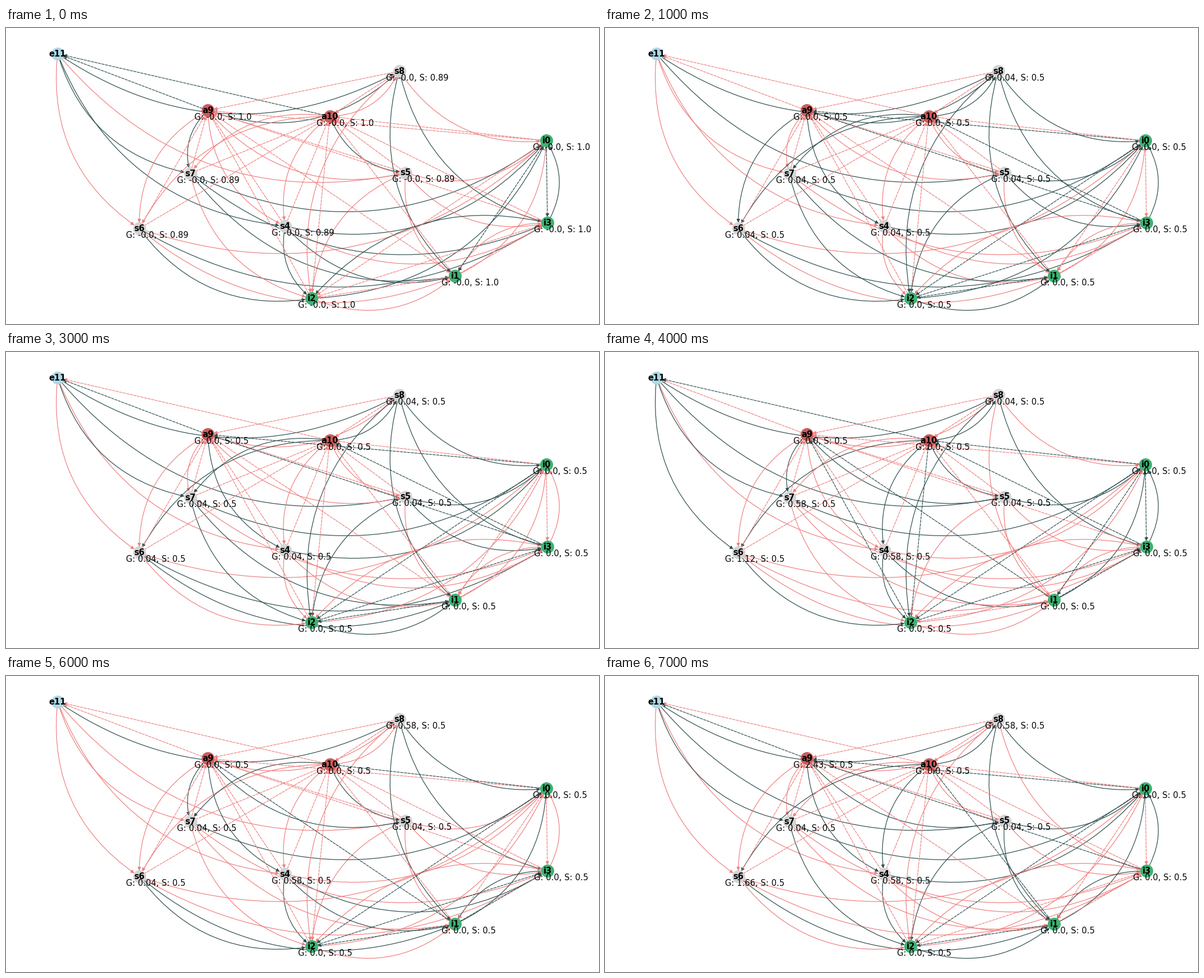
A matplotlib script that plays this animation: 1058 by 529 pixels, repeating every 8000 ms.

```python
import matplotlib.pyplot as plt
from matplotlib.animation import FuncAnimation
from matplotlib.patches import FancyArrowPatch

W, H, DPI = 1058, 529, 88.1667
RED, DARK = "lightcoral", "darkslategrey"
FILL = {"e": "lightblue", "a": "indianred", "s": "lightgrey", "i": "mediumseagreen"}
NODE_SIZE = 300

POS = {
    "e11": (92, 46), "s8": (701.7, 77), "a9": (360, 147.5), "a10": (577.7, 158),
    "i0": (964, 201.5), "s7": (328.7, 260), "s5": (713, 258.7), "s4": (498, 354.2),
    "s6": (237.7, 358.5), "i3": (966, 348.5), "i1": (801, 443.5), "i2": (545, 483.5),
}

# Dark edges of each step, as source>targets; every other edge is red.
STEPS = [
    "e11>s4,s7,s8 a9>e11,s7,s8 a10>e11,s5 s4>i0,i1,i2 s6>i2,i3 s7>i0,i1,i3 "
    "s8>i1,i3 i0>i1,i3 i2>i0 i3>i0,i2",

    "e11>s5,s8 a9>s4,s6,s8 a10>s6,s7,s8 s4>i0 s5>i0,i2,i3 s6>i2,i3 s7>i0,i1,i2 "
    "s8>i0,i1,i2,i3 i0>a9,i2 i1>i2 i2>i0,i1,i3 i3>i0,a9,a10",

    "e11>s5,s7,s8 a9>e11,s4,s6,s8 a10>s6,s7,s8 s4>i0 s5>i0,i2,i3 s6>i3 "
    "s7>i0,i1,i2 s8>i0,i1,i2,i3 i0>a9,i2 i1>i2 i2>i0,i1,i3 i3>a9,a10",

    "e11>s5,s7,s8 a9>e11,s4 a10>s6,s7,s8 s4>i0 s5>i0,i2,i3 s6>i1,i3 "
    "s7>i0,i1,i2 s8>i0,i1,i2,i3 i0>a9,i2 i1>i2 i2>i1,i3 i3>a9,a10",

    "e11>s5,s6,s7,s8 a9>s5,s7 a10>e11,s4,s5,s6,s8 s4>i1,i2 s5>i0 s6>i2 s7>i0 "
    "s8>i2,i3 i0>a10,i1,i2,i3 i1>a9,i0,i3 i2>a9,a10,i3 i3>a10,i0",

    "e11>s5,s6,s7,s8 a9>s5,s6,s7,s8 a10>e11,s7 s4>i0,i2 s5>i3 s6>i0,i1,i3 "
    "s7>i0,i1,i2,i3 s8>i2 i0>i2,i3 i1>a9,i2,i3 i2>a9,i0 i3>a9,a10,i0,i1,i2",

    "e11>s8 a9>s4,s5,s7 a10>s5,s7 s4>i1,i2,i3 s6>i1,i2 s7>i0 s8>i0,i1,i3 "
    "i0>a10,i2 i1>a9,i0,i2,i3 i2>i3 i3>i1",

    "e11>s5,s7,s8 a9>e11,s4,s5 a10>s4,s6,s8 s4>i0,i2 s5>i0,i1,i2 s6>i1 s7>i0,i2 "
    "s8>i0,i1 i0>a9,i2 i1>a10,i0,i2 i2>i1 i3>a9,i0,i1",
]

# Gains that differ from the usual value of their kind.
GAINS = [
    {}, {}, {}, {},
    {"s4": 0.58, "s6": 1.12, "s7": 0.58},
    {"s4": 0.58, "s7": 0.58, "a10": 2.43},
    {"s4": 0.58, "s8": 0.58},
    {"s4": 0.58, "s8": 0.58, "s6": 1.66, "a9": 2.43},
]


def dark_edges(step):
    groups = (g.split(">") for g in step.split())
    return {(src, dst) for src, dsts in groups for dst in dsts.split(",")}


def caption(node, k):
    sensor = node[0] == "s"
    if k == 0:
        return f"G: -0.0, S: {0.89 if sensor else 1.0}"
    return f"G: {GAINS[k].get(node, 0.04 if sensor else 0.0)}, S: 0.5"


def pairs(sources, targets):
    return [(a, b) for a in sources for b in targets]


E, A = ["e11"], ["a9", "a10"]
S = [f"s{n}" for n in range(4, 9)]
I = [f"i{n}" for n in range(4)]
curved = pairs(E, S) + pairs(A, S) + pairs(S, I) + [p for p in pairs(I, I) if p[0] > p[1]]
dashed = pairs(A, E) + pairs(S, A) + pairs(I, A) + [p for p in pairs(I, I) if p[0] < p[1]]

fig = plt.figure(figsize=(12, 6), dpi=DPI, facecolor="white")
ax = fig.add_axes([0, 0, 1, 1])
ax.set_xlim(0, W)
ax.set_ylim(H, 0)
ax.axis("off")
plt.rcParams["font.family"] = "DejaVu Sans"


def add_edge(edge, rad, style):
    shrink = NODE_SIZE ** 0.5 / 2
    arrow = FancyArrowPatch(
        POS[edge[0]], POS[edge[1]], arrowstyle="-|>", mutation_scale=10,
        connectionstyle=f"arc3,rad={rad}", shrinkA=shrink, shrinkB=shrink,
        linewidth=1, linestyle=style, color=RED, zorder=1)
    ax.add_patch(arrow)
    return arrow


arrows = {e: add_edge(e, 0.3, "solid") for e in curved}
arrows.update({e: add_edge(e, 0, "dashed") for e in dashed})

captions = {}
for name, (x, y) in POS.items():
    ax.scatter(x, y, s=NODE_SIZE, color=FILL[name[0]], linewidths=1.5, zorder=2)
    ax.text(x, y, name, size=12, weight="bold", ha="center", va="center", zorder=3)
    if name != "e11":
        captions[name] = ax.text(x - 24, y + 16.6, "", size=12, zorder=3)

DARK_SETS = [dark_edges(s) for s in STEPS]


def update(k):
    for edge, arrow in arrows.items():
        arrow.set_color(DARK if edge in DARK_SETS[k] else RED)
    for name, text in captions.items():
        text.set_text(caption(name, k))
    return [*arrows.values(), *captions.values()]


anim = FuncAnimation(fig, update, frames=len(STEPS), interval=1000,
                     repeat=True, repeat_delay=0, blit=False)
plt.show()
```
